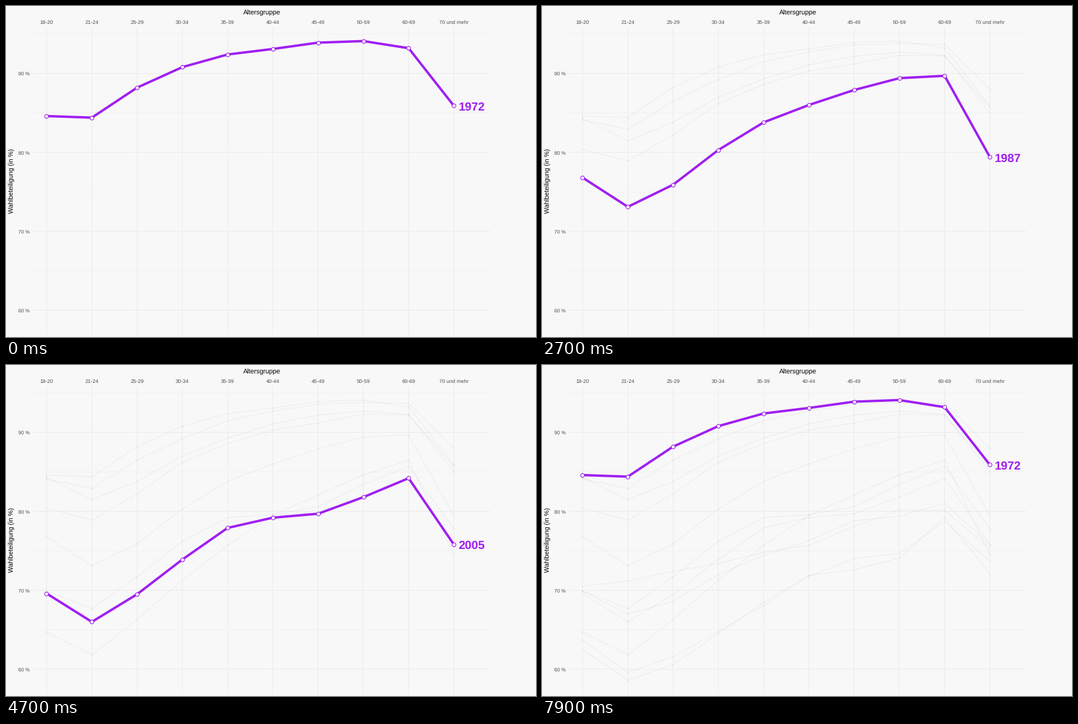
Recreate the animation shown at these times as a matplotlib script. Size 947 by 592 pixels, loop 10 s.

```python
import matplotlib.pyplot as plt
from matplotlib.animation import FuncAnimation

WIDTH, HEIGHT, DPI = 947, 592, 64
PT = 72 / DPI  # points per pixel
STEP = 100  # ms per frame
LOOP = 10000

BACKGROUND = "#f8f8f8"
GRID = "#ebebeb"
PURPLE = "#a020f0"
LEFT, RIGHT, TOP, BOTTOM = 48.5, 865, 38, 588.5

AGES = ["18-20", "21-24", "25-29", "30-34", "35-39",
        "40-44", "45-49", "50-59", "60-69", "70 und mehr"]
TURNOUT = {
    1972: [84.6, 84.4, 88.2, 90.8, 92.4, 93.1, 93.9, 94.1, 93.2, 85.9],
    1976: [84.1, 82.9, 86.5, 89.2, 91.5, 92.7, 93.6, 93.8, 93.7, 88.0],
    1980: [80.4, 78.9, 82.2, 86.2, 88.6, 90.3, 91.2, 92.3, 92.2, 85.7],
    1983: [84.3, 81.5, 83.8, 87.0, 89.3, 91.1, 92.2, 92.7, 92.3, 85.0],
    1987: [76.8, 73.1, 75.9, 80.3, 83.8, 86.0, 87.9, 89.4, 89.7, 79.4],
    1990: [64.7, 61.8, 66.3, 71.3, 75.7, 79.5, 82.1, 84.6, 86.5, 74.5],
    2002: [69.9, 67.7, 71.7, 76.2, 79.2, 79.6, 80.6, 83.4, 85.7, 77.8],
    2005: [69.6, 66.0, 69.5, 73.9, 77.9, 79.2, 79.7, 81.8, 84.2, 75.8],
    2009: [62.5, 58.6, 60.6, 64.5, 68.5, 71.9, 72.6, 74.1, 79.2, 72.1],
    2013: [63.7, 59.6, 61.6, 64.8, 68.1, 71.8, 74.0, 74.7, 78.7, 73.7],
    2017: [69.9, 67.0, 68.6, 72.0, 74.4, 76.3, 78.8, 79.4, 81.0, 75.8],
    2021: [70.5, 71.2, 72.4, 73.4, 74.8, 75.7, 78.1, 80.2, 80.1, 75.3],
}
YEARS = list(TURNOUT)
CHANGES = [600, 1300, 2000, 2700, 3400, 4000,
           4700, 5400, 6100, 6700, 7300, 7900]

plt.rcParams["font.family"] = "Liberation Sans"
plt.rcParams["text.hinting"] = "none"


def y_of(percent):
    return 120.6 + (90 - percent) * 14.117


def label(x, y, text, size, color, ha="center", **kwargs):
    return ax.text(x, y, text, fontsize=size * PT, color=color, ha=ha,
                   va="baseline", **kwargs)


def grid_line(xs, ys, width):
    ax.plot(xs, ys, color=GRID, lw=width * PT, snap=False,
            solid_capstyle="butt", zorder=1)


fig = plt.figure(figsize=(WIDTH / DPI, HEIGHT / DPI), dpi=DPI,
                 facecolor=BACKGROUND)
ax = fig.add_axes([0, 0, 1, 1])
ax.set(xlim=(0, WIDTH), ylim=(HEIGHT, 0))
ax.axis("off")

xs = [72.5 + 80.86 * i for i in range(len(AGES))]
for x, age in zip(xs, AGES):
    grid_line([x, x], [TOP, BOTTOM], 1.1)
    label(x, 31.6, age, 9.4, "#4d4d4d")
for percent in range(60, 100, 5):
    y = y_of(percent)
    major = percent % 10 == 0
    grid_line([LEFT, RIGHT], [y, y], 1.1 if major else 0.55)
    if major:
        label(42.5, y + 3.8, f"{percent} %", 9, "#4d4d4d", ha="right")
label(457, 16, "Altersgruppe", 11.7, "black")
label(14, 313, "Wahlbeteiligung (in %)", 11.6, "black",
      rotation=90, rotation_mode="anchor")

curves = [[y_of(v) for v in TURNOUT[year]] for year in YEARS]
past = [ax.plot(xs, ys, color="black", alpha=0.05, lw=1.1 * PT, marker="o",
                ms=2.2 * PT, mew=0, zorder=2)[0] for ys in curves]
current, = ax.plot([], [], color=PURPLE, lw=4.3 * PT, marker="o",
                   ms=6.8 * PT, mfc="white", mec=PURPLE, mew=1.25 * PT,
                   solid_joinstyle="round", zorder=3)
year_label = label(808.5, 0, "", 21.3, PURPLE, ha="left", weight="bold")


def update(frame):
    stage = sum(frame * STEP >= t for t in CHANGES)
    shown = stage % len(YEARS)  # the last stage returns to the first year
    for i, line in enumerate(past):
        line.set_visible(i < stage)
    current.set_data(xs, curves[shown])
    year_label.set_text(str(YEARS[shown]))
    year_label.set_y(curves[shown][-1] + 8.2)
    return [*past, current, year_label]


anim = FuncAnimation(fig, update, frames=LOOP // STEP, interval=STEP,
                     repeat=True, repeat_delay=0, blit=False)
plt.show()
```
